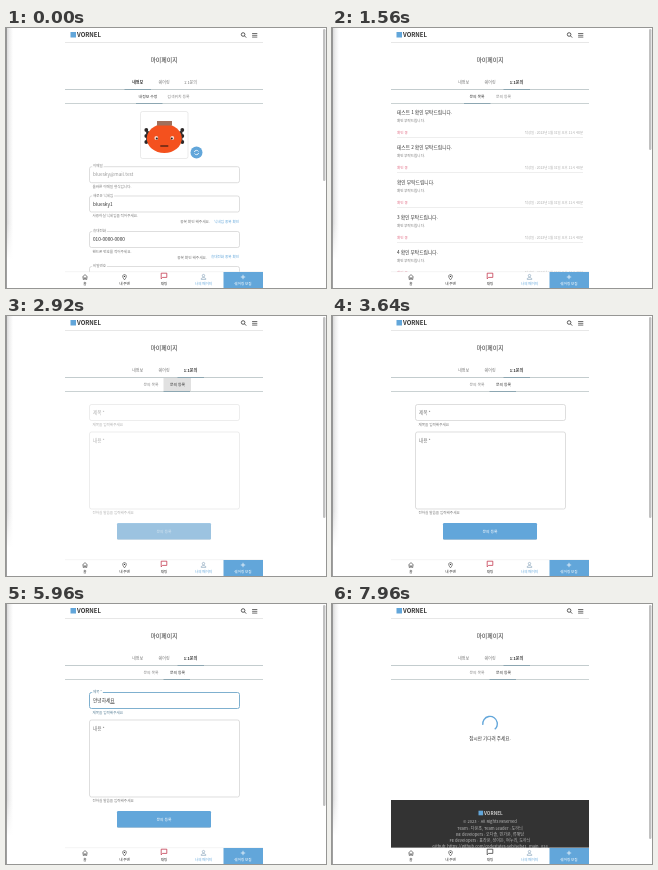
Write an HTML page with a canvas that moves like this. It is 320x260 px and loops after 8000 ms.

```html
<!DOCTYPE html>
<html lang="ko">
<head>
<meta charset="utf-8">
<title>마이페이지</title>
<style>
  html, body { margin: 0; width: 100%; height: 100%; overflow: hidden; background: #fff; }
  canvas { display: block; width: 320px; height: 260px; }
</style>
</head>
<body>
<canvas id="stage"></canvas>
<script>
const LOOP = 8000;
const BLUE = '#62a6da', INK = '#333', GRAY = '#777', PALE = '#aaa', LINE = '#ddd', STEEL = '#7f9dab';
const FONT = '"Noto Sans CJK KR", "Noto Sans CJK JP", "Noto Sans CJK", "Noto Sans", sans-serif';

// Moments at which the user acts
const OPEN_LIST = 160, OPEN_DETAIL = 1640, DETAIL_READY = 1840, OPEN_FORM = 2640;
const FOCUS_TITLE = 3800, FOCUS_BODY = 6300, SUBMIT = 7440;
const TITLE_KEYS = 'ㅇ 아 안 안 안ㄴ 안ㄴ 안녀 안녕 안녕ㅎ 안녕하 안녕하ㅅ 안녕하세 안녕하세ㅇ 안녕하세요'.split(' ');
const BODY_KEYS = 'ㄴ 내 내ㅇ 내요 내용'.split(' ');

const canvas = document.getElementById('stage');
const scale = Math.max(1, window.devicePixelRatio || 1);
canvas.width = 320 * scale;
canvas.height = 260 * scale;
const c = canvas.getContext('2d');

const clamp = x => Math.min(1, Math.max(0, x));
const ease = x => { x = clamp(x); return x * x * (3 - 2 * x); };
const mix = (a, b, k) => a + (b - a) * k;

function rect(x, y, w, h, color) {
  c.fillStyle = color;
  c.fillRect(x, y, w, h);
}

function box(x, y, w, h, r, fill, stroke, width = 0.6) {
  c.beginPath();
  c.roundRect(x, y, w, h, r);
  if (fill) { c.fillStyle = fill; c.fill(); }
  if (stroke) { c.strokeStyle = stroke; c.lineWidth = width; c.stroke(); }
}

function button(label, x, y, w, h) {
  box(x, y + 0.5, w, h, 1.2, 'rgba(0,0,0,0.15)');
  box(x, y, w, h, 1.2, BLUE);
  text(label, x + w / 2, y + h / 2, 3.9, '#fff', 'center', 500);
}

function disc(x, y, rx, color, ry = rx) {
  c.beginPath();
  c.ellipse(x, y, rx, ry, 0, 0, 7);
  c.fillStyle = color;
  c.fill();
}

// y is the visual middle of the line
function text(s, x, y, size, color = INK, align = 'left', weight = 400) {
  c.font = `${weight} ${size}px ${FONT}`;
  c.textAlign = align;
  c.fillStyle = color;
  c.fillText(s, x, y + size * 0.36);
}

function path(d, x, y, color, width = 0.7) {
  c.save();
  c.translate(x, y);
  c.strokeStyle = color;
  c.lineWidth = width;
  c.stroke(new Path2D(d));
  c.restore();
}

function windowEdge() {
  const g = c.createLinearGradient(0, 0, 7, 0);
  g.addColorStop(0, '#d4d4d4');
  g.addColorStop(0.5, '#efefef');
  g.addColorStop(1, '#fff');
  rect(0, 0, 7, 232, g);
  const fade = c.createLinearGradient(0, 195, 0, 232);
  fade.addColorStop(0, 'rgba(255,255,255,0)');
  fade.addColorStop(1, '#fff');
  rect(0, 195, 7, 37, fade);
  rect(0, 0, 0.8, 260, '#888');
}

function scrollbar(bottom) {
  if (bottom) box(317, 1, 2.4, bottom - 1, 1.2, '#c1c1c1');
}

function header() {
  rect(64.5, 4, 5.5, 5.5, BLUE);
  text('VORNEL', 71, 7, 6, '#333', 'left', 700);
  path('M1 1L2.7 2.7M1.4 -0.4A1.8 1.8 0 1 1 -2.2 -0.4A1.8 1.8 0 1 1 1.4 -0.4', 237.5, 6.9, INK, 0.8);
  path('M-2.6 -1.8H2.6M-2.6 0H2.6M-2.6 1.8H2.6', 248.7, 7.3, INK);
  rect(59, 14, 198, 0.7, '#ddd');
  text('마이페이지', 158, 31.5, 5.9, INK, 'center');
}

function tabs(t) {
  const inquiry = t >= OPEN_LIST, form = t >= OPEN_FORM;
  ['내정보', '쉐어링', '1:1문의'].forEach((name, i) => {
    const on = i === (inquiry ? 2 : 0);
    text(name, 131.7 + i * 26.4, 54.5, 4, on ? INK : GRAY, 'center', on ? 700 : 400);
  });
  rect(59, 61, 198, 0.7, '#a9b6b9');
  rect(mix(118.5, 171.5, ease((t - OPEN_LIST) / 300)), 61, 26.5, 0.8, STEEL);

  const ripple = ease((t - OPEN_FORM) / 120) * (1 - ease((t - OPEN_FORM - 260) / 350));
  if (ripple > 0) rect(157.5, 62, 27.5, 13, `rgba(0,0,0,${0.12 * ripple})`);
  const names = inquiry ? ['문의 목록', '문의 등록'] : ['내정보 수정', '검색위치 등록'];
  names.forEach((name, i) => {
    const on = i === (form ? 1 : 0);
    text(name, (inquiry ? 145 : 142) + i * (inquiry ? 26.5 : 30.5), 68.5, 3.9,
      on ? INK : '#888', 'center', on ? 500 : 400);
  });
  rect(59, 75, 198, 0.7, '#b4bfc1');
  const from = inquiry ? 132 : 130;
  rect(mix(from, 157.5, ease((t - OPEN_FORM) / 250)), 75, 26.5, 0.8, STEEL);
}

function bottomNav(t) {
  rect(59, 244, 198, 16, '#fff');
  rect(59, 243.6, 198, 0.5, '#e8e8e8');
  rect(217.5, 244, 39.5, 16, BLUE);
  path('M-2.6 0L0 -2.4L2.6 0M-1.8 -0.4V2.4H-0.6V0.8H0.6V2.4H1.8V-0.4', 79, 249, INK, 0.6);
  path('M0 2.8C-2.7 -0.2 -2 -2.4 0 -2.4S2.7 -0.2 0 2.8Z', 118.5, 249, INK, 0.6);
  disc(118.5, 248.4, 0.6, INK);

  // Chat icon pulses between red and black
  const dark = ease(1.8 - Math.abs(t % 1200 - 860) / 175);
  const bubble = `rgb(${mix(190, 40, dark)},${mix(35, 40, dark)},${mix(60, 40, dark)})`;
  path('M-2.8 3V-2.6H2.8V1.6H-1.4Z', 158, 247.8, bubble);

  path('M-2.3 2.4V1.8C-2.3 0.2 2.3 0.2 2.3 1.8V2.4ZM1.2 -1.4A1.2 1.2 0 1 1 -1.2 -1.4A1.2 1.2 0 1 1 1.2 -1.4',
    197.5, 249, '#7f9db5', 0.6);
  path('M-2.2 0H2.2M0 -2.2V2.2', 237, 249, '#fff');
  ['홈', '내 주변', '채팅', '나의 페이지', '쉐어링 모집'].forEach((name, i) =>
    text(name, 79 + i * 39.5, 255.6, 3.6, [INK, INK, INK, BLUE, '#fff'][i], 'center'));
}

function footer(top) {
  rect(59, top, 198, 260 - top, '#333');
  rect(146.5, top + 10.7, 4.6, 4.6, BLUE);
  text('VORNEL', 152, top + 13, 4.7, '#ccc', 'left', 700);
  [
    '© 2023 · All Rights Reserved',
    'Team : 다온조, Team Leader : 도하늬',
    'BE developers : 오다솔, 민가온, 류해담',
    'FE developers : 표라온, 성이든, 여누리, 도하늬',
    'Github: https://github.com/codestates-seb/seb41_main_024'
  ].forEach((line, i) => text(line, 158, top + 22 + i * 6.2, 4.1, '#bbb', 'center'));
}

function avatar() {
  box(134.5, 83.5, 47.5, 47, 2, '#fff', LINE);
  for (const side of [-1, 1])
    for (let i = 0; i < 5; i++)
      disc(158.3 + side * (18 - (i % 2) * 1.6), 102 + i * 3, 1.9, '#2b2727');
  disc(158.3, 110.5, 17.5, '#f4511e', 14.5);
  rect(151, 93, 15, 4.5, '#a0705c');
  for (const side of [-1, 1]) {
    disc(158.3 + side * 8, 110, 1.9, '#fbd9cc');
    disc(158.3 + side * 7.5, 110.4, 1, '#222');
  }
  path('M-4 0H4', 158.3, 118, '#3a1a12', 1.2);
  disc(190.5, 124.5, 6, BLUE);
  path('M2 -1A2.3 2.3 0 0 0 -2.2 -0.5M-2 1A2.3 2.3 0 0 0 2.2 0.5', 190.5, 124.5, '#fff', 0.8);
}

function field({ y, h = 16, label, value = '', helper, float = 1, focus = false, composing = false, ink = INK, caret = false }) {
  const accent = focus ? '#5d8399' : GRAY;
  box(83.5, y, 150, h, 2, '#fff', focus ? '#7fb0cf' : '#d0d0d0', focus ? 1 : 0.7);
  const size = mix(4.6, 3.5, float);
  if (float > 0.5) {
    c.font = `400 ${size}px ${FONT}`;
    rect(86.2, y - 1, c.measureText(label).width + 1.8, 2, '#fff');
  }
  text(label, 87, mix(y + 8, y - 0.5, float), size, accent);
  text(value, 87, y + 8, 4.7, ink);
  const width = c.measureText(value).width;
  if (composing) rect(87 + width - 4.4, y + 10.8, 4.4, 0.6, INK);
  if (caret) rect(87.3 + width, y + 5.4, 0.5, 5.4, INK);
  if (helper) text(helper, 86.5, y + h + 3.8, 3.6, accent);
}

function profile() {
  avatar();
  field({ y: 138.7, label: '이메일', value: 'bluesky@mail.test', helper: '올바른 이메일 형식입니다.', ink: '#999' });
  field({ y: 168, label: '새로운 닉네임', value: 'bluesky1', helper: '사용하실 닉네임을 적어주세요.' });
  text('중복 확인 해주세요.', 204, 193.6, 3.7, GRAY, 'right');
  text('닉네임 중복 확인', 233, 193.6, 3.6, BLUE, 'right');
  field({ y: 203.5, label: '휴대전화', value: '010-0000-0000', helper: '핸드폰 번호를 적어주세요.' });
  text('중복 확인 해주세요.', 201, 229.2, 3.7, GRAY, 'right');
  text('휴대전화 중복 확인', 233, 229.2, 3.6, BLUE, 'right');
  field({ y: 238.5, label: '비밀번호' });
}

const REQUEST = '확인 부탁드립니다.';
const WRITTEN = '작성일 : 2023년 1월 31일 오후 11시 48분';

function list() {
  ['테스트 1 ', '테스트 2 ', '', '3 ', '4 '].forEach((prefix, i) => {
    const y = i * 35;
    text(prefix + REQUEST, 65, 84.6 + y, 4.75);
    text(REQUEST, 65, 93 + y, 3.55, GRAY);
    text('확인 중', 65, 104.3 + y, 3.6, '#e2738a');
    text(WRITTEN, 251, 104.3 + y, 3.4, PALE, 'right');
    rect(65, 109.3 + y, 186, 0.5, LINE);
  });
}

function detail(t) {
  footer(181);
  if (t < DETAIL_READY) return;
  text('테스트 1 ' + REQUEST, 65, 92, 7);
  text(WRITTEN, 252, 104.5, 3.4, PALE, 'right');
  text(REQUEST, 65, 119.4, 4.6);
  button('수정하기', 227.5, 134.5, 25, 11);
}

function typed(keys, t, start, gap) {
  const i = Math.min(keys.length - 1, Math.floor((t - start) / gap));
  return i < 0 ? '' : keys[i];
}

function form(t) {
  const title = typed(TITLE_KEYS, t, 4400, 110);
  const body = typed(BODY_KEYS, t, 6800, 120);
  const onBody = t >= FOCUS_BODY, onTitle = t >= FOCUS_TITLE && !onBody;
  const blink = t % 1000 < 500;
  c.globalAlpha = ease((t - OPEN_FORM - 20) / 480);
  field({
    y: 88.5, label: '제목 *', value: title, helper: '제목을 입력해주세요',
    float: ease((t - FOCUS_TITLE) / 200), focus: onTitle,
    composing: onTitle && title !== '', caret: onTitle && blink
  });
  field({
    y: 116, h: 77, label: '내용 *', value: body, helper: '전하실 말씀을 입력해주세요',
    float: ease((t - FOCUS_BODY) / 200), focus: onBody,
    composing: body !== '', caret: onBody && blink
  });
  button('문의 등록', 111, 207, 94, 16.5);
  c.globalAlpha = 1;
}

function loading(t) {
  footer(196);
  const p = (t - SUBMIT) / 1400 % 1;
  const grow = ease(p * 2), slide = ease(p * 2 - 1);
  const unit = Math.PI * 2 / 126;
  const start = p * Math.PI * 2 + (15 * grow + 110 * slide) * unit;
  const length = Math.min(mix(1, 100, grow), 126 - 15 * grow - 110 * slide) * unit;
  c.beginPath();
  c.arc(158, 119.7, 7.3, start, start + length);
  c.strokeStyle = BLUE;
  c.lineWidth = 1.4;
  c.stroke();
  text('잠시만 기다려 주세요.', 158, 134.3, 4.6, INK, 'center');
}

// Each view: start time, painter, bottom of the scrollbar thumb (0 when the page fits)
const VIEWS = [
  [0, profile, 153],
  [OPEN_LIST + 80, list, 122],
  [OPEN_DETAIL, detail, 0],
  [OPEN_FORM, form, 202],
  [SUBMIT, loading, 235]
];

function draw(t) {
  c.setTransform(scale, 0, 0, scale, 0, 0);
  rect(0, 0, 320, 260, '#fff');
  windowEdge();
  const [, paint, thumb] = VIEWS.filter(v => t >= v[0]).pop();
  scrollbar(thumb);
  if (!thumb) c.translate(2, 0);
  header();
  tabs(t);
  paint(t);
  bottomNav(t);
}

const began = performance.now();
function tick() {
  draw((performance.now() - began) % LOOP);
  requestAnimationFrame(tick);
}
tick();
</script>
</body>
</html>
```
